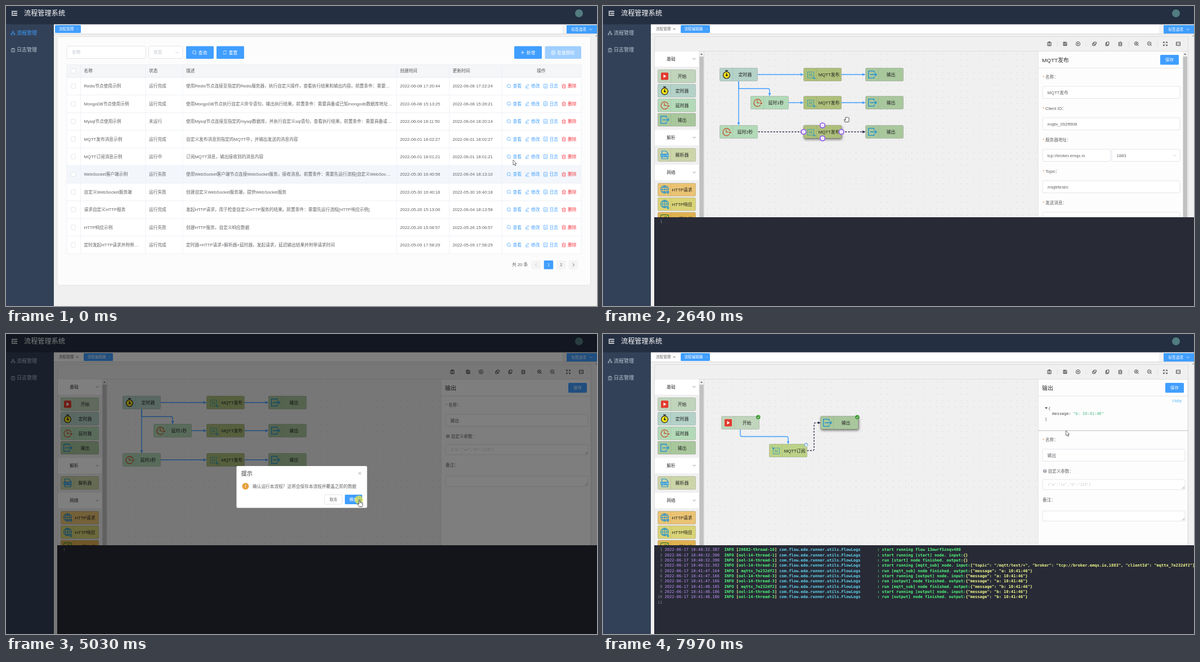
Animation, 1050 px wide and 534 px high, one loop 8000 ms. Source, as an HTML page:

```html
<!DOCTYPE html>
<html>
<head>
<meta charset="utf-8">
<style>
html, body { margin: 0; width: 100%; height: 100%; overflow: hidden; background: #f0f0f0 }
svg { display: block; width: 1050px; height: 534px }
text { font-family: "Liberation Sans", "Noto Sans CJK SC", "Noto Sans CJK", sans-serif; white-space: pre }
.mono { font-family: "DejaVu Sans Mono", monospace }
</style>
</head>
<body>
<svg id="stage" viewBox="0 0 1050 534"></svg>
<script>
const BLUE = '#409eff', RED = '#f5323c', INK = '#606266', LINE = '#dcdfe6';

// Drawing helpers, all returning SVG markup
const rect = (x, y, x2, y2, fill, stroke = 'none', r = 0, more = '') =>
  `<rect x="${x}" y="${y}" width="${x2 - x}" height="${y2 - y}" rx="${r}" fill="${fill}" stroke="${stroke}" stroke-width=".8" ${more}/>`;
const path = (d, stroke, w = 1, fill = 'none', more = '') =>
  `<path d="${d}" stroke="${stroke}" stroke-width="${w}" fill="${fill}" ${more}/>`;
const circle = (x, y, r, fill, stroke = 'none', w = 1, more = '') =>
  `<circle cx="${x}" cy="${y}" r="${r}" fill="${fill}" stroke="${stroke}" stroke-width="${w}" ${more}/>`;
const text = (x, y, s, fill = INK, size = 7.7, more = '') =>
  `<text x="${x}" y="${y + size * .36}" font-size="${size}" fill="${fill}" ${more}>${s}</text>`;
const mid = (x, y, s, fill, size) => text(x, y, s, fill, size, 'text-anchor="middle"');
const at = (x, y, s, more = '') => `<g transform="translate(${x} ${y})" ${more}>${s}</g>`;
const chevron = (x, y, c = '#999') => path(`M${x - 2.5} ${y - 1.2}l2.5 2.5l2.5-2.5`, c, .8);
const cross = (x, y, r, c) => path(`M${x - r} ${y - r}l${2 * r} ${2 * r}m0 ${-2 * r}l${-2 * r} ${2 * r}`, c, .8);

const small = {
  search: 'M2 2l1.3 1.3M2.7-.3a3 3 0 1 1-6 0a3 3 0 1 1 6 0',
  edit: 'M-2.5 2l.5-2l3.5-3.5l1.5 1.5l-3.5 3.5zM-3 3.5h6',
  doc: 'M-3-3.5h6v7h-6zM-1.3-.5h2.6M-1.3 1.5h2.6',
  trash: 'M-3.5-2h7M-1-3.5h2M-2.6-2v5.5h5.2v-5.5M-1-.3v2.3M1-.3v2.3',
  reset: 'M-3-.5a3 3 0 0 1 5.5-1.2v-1.6M3 .5a3 3 0 0 1-5.5 1.2v1.6',
  plus: 'M-3 0h6M0-3v6',
  log: 'M-3-2.5h6v6h-6zM-1-3.5h2v1.5h-2zM-1.3.3h2.6M-1.3 1.9h2.6',
  save: 'M-3-3h5l1 1v5h-6zM-1.5-3v2h2.5v-2M-1.5 3v-2.3h3v2.3',
  play: 'M3.6 0a3.6 3.6 0 1 1-7.2 0a3.6 3.6 0 1 1 7.2 0M-.8-1.2l2 1.2l-2 1.2z',
  stop: 'M3.6 0a3.6 3.6 0 1 1-7.2 0a3.6 3.6 0 1 1 7.2 0M-.8-.8h1.6v1.6h-1.6z',
  layers: 'M-1.2-3h4.4v3.6h-4.4zM-1.2-1h-2v4h4.6v-2.2',
  copy: 'M-1.2-3.3h4v5h-4zM-1.2-1.5h-1.6v5h4v-1.6',
  zoomIn: 'M2 2l1.7 1.7M-2-.5h3M-.5-2v3M2.6-.5a3 3 0 1 1-6.2 0a3 3 0 1 1 6.2 0',
  zoomOut: 'M2 2l1.7 1.7M-2-.5h3M2.6-.5a3 3 0 1 1-6.2 0a3 3 0 1 1 6.2 0',
  full: 'M-3.3-1.2v-2.1h2.1m-2.1 0l2.3 2.3M3.3-1.2v-2.1h-2.1m2.1 0l-2.3 2.3M-3.3 1.2v2.1h2.1m-2.1 0l2.3-2.3M3.3 1.2v2.1h-2.1m2.1 0l-2.3-2.3',
  code: 'M-3.5-3h7v6h-7zM-.8-1.2l-1.2 1.2l1.2 1.2M.8-1.2l1.2 1.2l-1.2 1.2',
  tree: 'M-1-3.3h2v2h-2zM-3.5 1.3h2v2h-2zM1.5 1.3h2v2h-2zM0-1.3v1.3M-2.5 1.3v-1.3h5v1.3'
};
const icon = (name, x, y, c, w = .8) => at(x, y, path(small[name], c, w));

function button(x, y, x2, y2, label, fill = BLUE, ic) {
  const cx = (x + x2) / 2 + (ic ? 5 : 0), cy = (y + y2) / 2, size = ic ? 7.7 : 7.4;
  return rect(x, y, x2, y2, fill, 'none', 1.6) + mid(cx, cy, label, '#fff', size) +
    (ic ? icon(ic, cx - label.length * size / 2 - 7, cy, '#fff') : '');
}

function frame(s) {
  const editing = s.view == 'edit';
  const nav = (y, ic, label, c) => icon(ic, 12.5, y + .5, c, .7) + text(19, y, label, c, 9);
  return rect(0, 0, 1050, 534, '#f0f0f0') + rect(85, 32, 1050, 49, '#fff') +
    rect(85, 49, 1050, 50, '#dedede') + rect(85, 50, 1050, 51, '#e9e9e9') + rect(988, 33, 996, 49, '#f2f2f2') +
    rect(0, 32, 85, 534, '#324157') + rect(0, 0, 1050, 32.6, '#242f42') +
    path('M10 9.5h10M14 13h6M10 16.5h10M10 11.3l2.5 1.7l-2.5 1.7', '#fff', 1.3) +
    text(32, 13, '流程管理系统', '#fff', 12.2, 'font-weight="500"') + circle(1018, 13, 7, '#527c80') +
    nav(47.5, 'tree', '流程管理', editing ? '#bfcbd9' : BLUE) + nav(78, 'log', '日志管理', '#bfcbd9') +
    (editing
      ? text(94, 41, '流程管理', '#666', 6.6) + cross(126.5, 41, 1.6, '#666') +
        rect(138, 34, 190, 48, BLUE, 'none', 1.5) + text(144.5, 41, '流程编辑器', '#fff', 6.6) + cross(184, 41, 1.6, '#79b9fb')
      : rect(87, 34, 133, 48, BLUE, 'none', 1.5) + text(94, 41, '流程管理', '#fff', 6.6) + cross(127, 41, 1.6, '#79b9fb')) +
    rect(996, 34, 1050, 49, BLUE) + text(1004.5, 41.5, '标签选项', '#fff', 6.6) + chevron(1039, 41.5, '#fff') +
    path('M1047 54l1.5-2l1.5 2z', 'none', 0, '#888');
}

const rows = [
  ['Redis节点使用示例', '运行完成', '使用Redis节点连接至指定的Redis服务器，执行自定义操作，查看执行结果和输出内容。前置条件：需要…', '06-08 17:20:44', '06-08 17:22:24'],
  ['MongoDB节点使用示例', '运行完成', '使用MongoDB节点执行自定义命令语句，输出执行结果。前置条件：需要具备或已知mongodb数据库地址…', '06-08 15:13:25', '06-08 15:26:21'],
  ['Mysql节点使用示例', '未运行', '使用Mysql节点连接至指定的mysql数据库，并执行自定义sql语句，查看执行结果。前置条件：需要具备或…', '06-04 18:11:50', '06-04 18:20:14'],
  ['MQTT发布消息示例', '运行完成', '自定义发布消息到指定的MQTT中，并输出发送的消息内容', '06-01 18:02:27', '06-01 18:02:27'],
  ['MQTT订阅消息示例', '运行中', '订阅MQTT消息，输出接收到的消息内容', '06-01 18:01:21', '06-01 18:01:21'],
  ['WebSocket客户端示例', '运行失败', '使用WebSocket客户端节点连接WebSocket服务，接收消息。前置条件：需要先运行流程[自定义WebSoc…', '05-30 16:40:58', '06-04 18:13:10'],
  ['自定义WebSocket服务端', '运行失败', '创建自定义WebSocket服务端，提供WebSocket服务', '05-30 16:40:18', '05-30 16:40:18'],
  ['请求自定义HTTP服务', '运行完成', '发起HTTP请求，用于检查自定义HTTP服务的结果。前置条件：需要先运行流程[HTTP响应示例]', '05-26 15:13:06', '06-04 18:13:58'],
  ['HTTP响应示例', '运行失败', '创建HTTP服务，自定义响应数据', '05-26 15:06:57', '05-26 15:06:57'],
  ['定时发起HTTP请求并附带…', '运行完成', '定时器+HTTP请求+解析器+延时器，发起请求，延迟输出结果并附带请求时间', '05-09 17:58:29', '05-09 17:58:29']
];
const cols = [138.5, 254, 320, 700, 793.5];

function list(s) {
  const check = y => rect(115.5, y - 4, 123.5, y + 4, '#fff', LINE, 1);
  const pager = (x, label, fill = '#f4f4f5', c = INK) =>
    rect(x, 453, x + 16.5, 468.5, fill, 'none', 1) + mid(x + 8.2, 460.7, label, c, 7.2);
  let out = rect(91, 54.5, 1038.5, 497, '#fcfcfc', '#ddd', 2) +
    rect(108, 71.5, 248, 93.5, '#fff', LINE, 2) + text(117, 82.5, '名称', '#c0c4cc') +
    rect(253.5, 71.5, 314, 93.5, '#fff', LINE, 2) + text(262, 82.5, '状态', '#c0c4cc') + chevron(304, 82.5, '#c0c4cc') +
    button(320, 71.5, 369, 94, '查询', BLUE, 'search') + button(374, 71.5, 423, 94, '重置', BLUE, 'reset') +
    button(903, 71.5, 952, 94, '新增', BLUE, 'plus') + button(957.5, 71.5, 1022, 94, '批量删除', '#a0cfff', 'trash') +
    rect(108, 104.5, 1022, 127, '#f5f6f8') + check(115.7) + mid(951, 115.7, '操作', '#555') +
    ['名称', '状态', '描述', '创建时间', '更新时间'].map((h, i) => text(cols[i], 115.7, h, '#555')).join('');
  rows.forEach((row, i) => {
    const top = 127 + i * 31.4, y = top + 15.6;
    out += rect(108, top, 1022, top + 31.4, i == s.row ? '#f3f7fc' : '#fff') + path(`M108 ${top}h914`, '#ebeef5', .8) + check(y);
    row.forEach((v, j) => out += text(cols[j], y, j > 2 ? '2022-' + v : v));
    [['search', '查看'], ['edit', '修改'], ['doc', '日志'], ['trash', '删除']].forEach(([ic, label], j) => {
      const c = j == 3 ? RED : BLUE;
      out += icon(ic, 893.5 + j * 32.5, y, c, .7) + text(900.5 + j * 32.5, y, label, c);
    });
  });
  return out + path('M108 104.5h914v336.5h-914zM132.5 104.5v336.5M248 104.5v336.5M314 104.5v336.5M694 104.5v336.5M787.5 104.5v336.5M881 104.5v336.5M108 127h914', '#ebeef5', .8) +
    text(899, 460.7, '共 20 条') + pager(933.5, '') + pager(955.7, '1', BLUE, '#fff') + pager(978, '2') + pager(999.8, '') +
    path('M943 458.2l-2.5 2.5l2.5 2.5', '#c0c4cc') + path('M1007 458.2l2.5 2.5l-2.5 2.5', INK);
}

const SKY = '#1f90d0', RUST = '#c9421f', LEAF = '#32852c';
const globe = circle(0, -.5, 6.8, 'none', SKY, 1.1) +
  path('M-6.8-.5h13.6M0-7.3v13.6M-5.5-4.5h11M-5.5 3.5h9M0-7.3c-5 4-5 10 0 13.6M0-7.3c5 4 5 10 0 13.6', SKY, .9);
const socket = circle(-3, 3.5, 1, LEAF) + rect(-7, -7, 7, 7, 'none', LEAF, 3, 'style="stroke-width:1.3"') +
  path('M-4 0a4 4 0 0 0 6 4M-4-2.5a6.5 6.5 0 0 0 8.5 5M-1-3.5h5', LEAF, 1.1);
const letterM = rect(-5, -4.5, 6, 6, 'none', '#2d9cae') + mid(.5, .8, 'M', '#2d9cae', 7);
const kinds = {
  start: ['#c0d5bc', rect(-6.5, -6.5, 6.5, 6.5, '#e23a2e', 'none', 1.5) + path('M-2-3l5 3l-5 3z', 'none', 0, '#fff')],
  timer: ['#b4d2c8', circle(0, 1, 6, '#f5e21c', '#222', 1.2) + path('M-2.5-7h5M0-7v2M0-2.5v4h2.5', '#222', 1.4) + circle(0, 1.5, 1.4, '#222')],
  delay: ['#b3dab8', path('M5.5 4a6.5 6.5 0 1 1 .8-5.5M-.5-4v4.5h4', RUST, 1.2) + path('M4 .3h5l-2.5 3z', 'none', 0, RUST)],
  output: ['#a9c79d', path('M3-3.5v-2.8h-9.8v12.6h9.8v-2.8M-4 0h11.5M4.5-3l3 3l-3 3', SKY, 1.3)],
  json: ['#ccd5a8', path('M-5-1v-6h7l3.5 3.5v2.5M-5 4v3h10.5v-3', SKY, 1.2) + rect(-7, -2, 7, 4, SKY) + mid(0, 1, 'JSON', '#fff', 5)],
  request: ['#eac373', globe + path('M6 8v-5M4 5l2-2l2 2', SKY, 1.3)],
  response: ['#d9d377', globe + path('M6 3v5M4 6l2 2l2-2', SKY, 1.3)],
  server: ['#dfb24f', socket],
  client: ['#e5bd89', socket],
  sub: ['#bcd287', letterM + path('M-8-6.5l4 3.5M-4-5.5v2.5h-2.5', SKY)],
  pub: ['#adbf7a', letterM + path('M4 4l4 3.5M8 5v2.5h-2.5', SKY)],
  mysql: ['#e5d291', circle(0, 0, 5.5, '#258fae')],
  next: ['#aac8e6', '']
};
function box(kind, label, x, y, dx, more = '') {
  const [fill, art] = kinds[kind];
  return `<g ${more}>` + rect(x, y - 11.5, x + 67, y + 11.5, fill, '#0003', 1.5) + path(`M${x + 23} ${y - 11.5}v23`, '#0001') +
    at(x + 12, y, art) + mid(x + dx, y + .3, label, '#222', 7.8) + '</g>';
}

const palette = [
  ['基础', 94, ['start', '开始'], ['timer', '定时器'], ['delay', '延时器'], ['output', '输出']],
  ['解析', 234, ['json', '解析器']],
  ['网络', 296, ['request', 'HTTP请求'], ['response', 'HTTP响应'], ['server', 'WS服务端'], ['client', 'WS客户端'], ['sub', 'MQTT订阅'], ['pub', 'MQTT发布']],
  ['数据库', 488, ['mysql', 'Mysql'], ['next', '']]
];
const tools = { log: 793, save: 821, play: 844, layers: 873, copy: 896, trash: 919, zoomIn: 948, zoomOut: 971, full: 999, code: 1022 };

const flows = [null, {
  nodes: {
    t: ['timer', '定时器', 207.5, 122], m1: ['pub', 'MQTT发布', 356.5, 122], o1: ['output', '输出', 466.5, 122],
    d1: ['delay', '延时1秒', 262.5, 172], m2: ['pub', 'MQTT发布', 356.5, 172], o2: ['output', '输出', 466.5, 172],
    d2: ['delay', '延时2秒', 207.5, 224], m3: ['pub', 'MQTT发布', 356.5, 224], o3: ['output', '输出', 466.5, 224]
  },
  edges: [['t', 'm1', 'M274.5 122H355.5'], ['m1', 'o1', 'M423.5 122H465.5'], ['d1', 'm2', 'M329.5 172H355.5'], ['m2', 'o2', 'M423.5 172H465.5'],
    ['d2', 'm3', 'M274.5 224H355.5'], ['m3', 'o3', 'M423.5 224H465.5'], ['t', 'd2', 'M241 134V211.5'], ['t', 'd1', 'M241 134V147H293q3 0 3 3V159.5']]
}, {
  nodes: { s: ['start', '开始', 210.5, 158], o: ['output', '输出', 386.5, 158], m: ['sub', 'MQTT订阅', 295.5, 207.5] },
  edges: [['s', 'm', 'M244 170V180q0 2.5 3 2.5H326q3 0 3 3V195'], ['m', 'o', 'M363 207.5H372q3 0 3-3V161q0-3 3-3H386']]
}];

function badge(x, y, done, t) {
  return done
    ? circle(x, y, 3.8, '#3d9a32') + path(`M${x - 1.8} ${y}l1.4 1.5l2.3-2.8`, '#fff', .9)
    : circle(x, y, 3, '#dbe9f2', '#a9c6dc', .8) + circle(x, y, 3, 'none', '#6aa5d8', 1, `stroke-dasharray="12 7" transform="rotate(${t / 3 % 360} ${x} ${y})"`);
}

function graph(s, t) {
  const { nodes, edges } = flows[s.flow];
  let out = '';
  for (const [a, b, d] of edges) {
    const live = s.sel == a || s.sel == b;
    out += path(d, live ? '#29264a' : BLUE, 1.4, 'none', live
      ? `stroke-dasharray="3 2.4" stroke-dashoffset="${-t / 40 % 5.4}" marker-end="url(#dark)"` : 'marker-end="url(#blue)"');
  }
  for (const id in nodes) {
    const [kind, label, x, y] = nodes[id];
    const lit = id == s.sel || id == s.over;
    out += box(kind, label, x, y, 45, lit ? 'style="filter:drop-shadow(1px 2px 2px #0008)"' : '');
    if (id == s.ports) for (const [dx, dy] of [[0, 0], [33.5, -11.5], [67, 0], [33.5, 11.5]])
      out += circle(x + dx, y + dy, 4.3, '#fff', '#9a66ee', 2) + circle(x + dx, y + dy, 1, '#caa8ff');
    if (s.busy.includes(id) || s.done.includes(id)) out += badge(x + 65.3, y - 10, s.done.includes(id), t);
  }
  return out;
}

function panel(s) {
  const tall = s.panel == 'mqtt', right = tall ? 1025 : 1034;
  const label = (y, v, must = 1) => (must ? text(781, y, '*', '#e6824a') : '') + text(must ? 786 : 781, y, v + '：', INK, 7.6);
  const field = (y, v, x = 781, x2 = right) => rect(x, y, x2, y + 21.5, '#fff', LINE, 2) + text(x + 8.5, y + 10.8, v);
  const area = (y, v = '') => rect(781, y, 1034, y + 18, '#fff', LINE, 2) + text(790, y + 9, v, '#c0c4cc', 6.4, 'class="mono"') +
    path(`M1029 ${y + 16.5}l4-4M1031.5 ${y + 16.5}l1.5-1.5`, '#777', .7);
  const titles = { mqtt: 'MQTT发布', delay: '延时2秒', out: '输出', json: '输出' };
  let form = label(126, '名称') + field(143, titles[s.panel]);
  if (tall) form += label(182, 'Client ID') + field(199, 'mqttx_092ff908') + label(238, '服务器地址') +
    field(255, 'tcp://broker.emqx.io', 781, 902) + field(255, '1883', 904, 1025) + chevron(1016, 266, '#c0c4cc') +
    label(294.5, 'Topic') + field(311, '/mqtt/test/c') + label(350.5, '发送消息') + field(367, 'c: ${timestamp}');
  else if (s.panel == 'delay') form += label(182, '延时时间') + field(199, '2', 781, 902) + field(199, '秒', 904, 1034) + chevron(1025, 210, '#c0c4cc') +
    label(238, '备注', 0) + area(256);
  else form += circle(785, 182, 3.3, '#a8abb2') + mid(785, 182, '?', '#fff', 5) + text(790.5, 182, '自定义参数：', INK, 7.6) +
    area(197, '{"a":"xx","b":"123"}') + label(233, '备注', 0) + area(253);
  return rect(773, 80.5, 1039, 378, '#fdfdfd', '#ddd') + text(780, 96, titles[s.panel], '#303133', 9.9) +
    path('M773 110.5h266', '#ddd', .8) + button(right - 35, 87, right - 2, 104.5, '保存') +
    (s.panel == 'json'
      ? text(1011, 118, 'copy', '#49b3ff', 7.2, 'class="mono"') + path('M785 130.5h5l-2.5 3z', 'none', 0, '#444') +
        text(791, 132, '{', '#555', 7, 'class="mono"') + text(798, 141.5, 'message:', '#444', 7, 'class="mono"') +
        text(835, 141.5, '"b: 10:41:46"', '#42b983', 7, 'class="mono"') + text(785, 151, '}', '#555', 7, 'class="mono"') +
        path('M773 172h266', '#bbb') + at(0, 62, form)
      : form) +
    (tall ? rect(1030, 81, 1038.5, 378, '#f1f1f1') + rect(1030.5, 90, 1038, 378, '#c1c1c1') + path('M1032 87l2.2-3l2.2 3z', 'none', 0, '#777') : '');
}

const logs = [[], [
  ['10:41:46.182', '20882-thread-11', 'start running flow 3gsaefsrjvc000'],
  ['10:41:46.186', 'ool-15-thread-1', 'start running [timer] node. input:{"times": "2", "period": "5,SECONDS", "timestamp": "HH:mm:ss"}'],
  ['10:41:46.188', 'scheduledTask-1', 'run [timer] node finished. output:{"timestamp": "10:41:46"}'],
  ['10:41:46.191', 'ool-15-thread-1', 'start running [mqtt_pub] node. input:{"topic": "/mqtt/test/a", "broker": "tcp://broker.emqx.io,1883", "message": "a: ${timestamp}", '],
  ['10:41:46.193', 'ool-15-thread-2', 'start running [delay] node. input:{"delay": "1,SECONDS", "payload": {"timestamp": "${timestamp}"}, "timestamp": "10:41:46"}'],
  ['10:41:46.194', 'ool-15-thread-3', 'start running [delay] node. input:{"delay": "2,SECONDS", "payload": {"timestamp": "${timestamp}"}, "timestamp": "10:41:46"}'],
  ['10:41:47.160', 'ool-15-thread-1', 'run [mqtt_pub] node finished. output:{"message": "a: 10:41:46"}']
], [
  ['10:40:32.387', '20882-thread-10', 'start running flow 13mwrf5znqv400'],
  ['10:40:32.390', 'ool-14-thread-1', 'start running [start] node. input:{}'],
  ['10:40:32.390', 'ool-14-thread-1', 'run [start] node finished. output:{}'],
  ['10:40:32.392', 'ool-14-thread-2', 'start running [mqtt_sub] node. input:{"topic": "/mqtt/test/+", "broker": "tcp://broker.emqx.io,1883", "clientId": "mqttx_7e232df2"}'],
  ...[['10:41:47.164', '10:41:47.166', 'a'], ['10:41:48.185', '10:41:48.186', 'b']].flatMap(([got, sent, k]) => {
    const body = `put:{"message": "${k}: 10:41:46"}`;
    return [[got, 'mqttx_7e232df2', 'run [mqtt_sub] node finished. out' + body],
      [sent, 'ool-14-thread-3', 'start running [output] node. in' + body],
      [sent, 'ool-14-thread-3', 'run [output] node finished. out' + body]];
  })
]];

function terminal([id, count]) {
  const span = (c, v, weight = 'bold') => `<tspan fill="${c}" font-weight="${weight}">${v}</tspan>`;
  let out = rect(91, 376, 1050, 534, '#282a36');
  for (let i = 0; i <= count; i++) {
    const y = 383.7 + i * 9.35;
    out += text(105.5, y, i + 1, '#7d8290', 7.05, 'class="mono" text-anchor="end"');
    if (i == count) break;
    const [time, thread, msg] = logs[id][i], cut = (msg + '{').indexOf('{');
    out += text(109.5, y, span('#bd93f9', '2022-06-17 ' + time, 'normal') + span('#50fa7b', '  INFO ') + span('#f1fa8c', '[') +
      span('#50fa7b', thread.padStart(15)) + span('#f1fa8c', ']') + span('#62d5f0', ' com.flow.eda.runner.utils.FlowLogs') +
      span('#50fa7b', '       : ' + msg.slice(0, cut)) + span('#f1fa8c', msg.slice(cut)), '#fff', 7.05, 'class="mono"');
  }
  return out;
}

function tooltip([x, label]) {
  const w = label.length * 3.35 + 5.3;
  return rect(x - w, 82, x + w, 101, '#303133', 'none', 2) + path(`M${x - 3} 82.2l3-3l3 3z`, 'none', 0, '#303133') + mid(x, 91.5, label, '#fff', 6.7);
}

function editor(s, t) {
  let out = rect(91.5, 54.5, 1039.5, 535, '#f0f0f0', '#d9d9d9') + rect(180, 80.5, 1039, 534, 'url(#grid)') +
    path('M91 80.5h948M179.5 80.5v454', '#d9d9d9', .8) + path('M807 63v9M858 63v9M934 63v9M985 63v9', '#ddd', .8);
  for (const k in tools) out += icon(k == 'play' && s.running ? 'stop' : k, tools[k], 67.3, '#333', .9);
  if (s.palette) {
    for (const [name, y, ...items] of palette) {
      out += rect(92, y - 13.5, 170, y + 14, '#fff') + mid(121, y, name, '#333', 7.7) + chevron(162, y, '#777');
      items.forEach(([kind, label], i) => out += box(kind, label, 97.5, y + 31 + i * 25.85, 43));
    }
    out += rect(171, 81, 179, 534, '#f1f1f1') + rect(171.3, 90, 178.7, 490, '#c1c1c1') + path('M172.7 87l2.2-3l2.2 3z', 'none', 0, '#777');
  }
  if (s.flow) out += graph(s, t);
  if (s.panel) out += panel(s);
  if (s.log) out += terminal(s.log);
  if (s.tip) out += tooltip(s.tip);
  return out;
}

const dialog = fade => `<g opacity="${fade}">` + rect(0, 0, 1050, 534, '#00000080') + rect(409.5, 235, 641.5, 309.5, '#fff', 'none', 2) +
  text(418, 248, '提示', '#303133', 9.9) + cross(628.5, 248, 2.5, '#909399') + circle(425.5, 271, 6, '#e6a23c') + mid(425.5, 271, '!', '#fff', 9) +
  text(438, 271, '确认运行本流程？这将会保存本流程并覆盖之前的数据') + rect(566, 286, 597, 303, '#fff', LINE, 2) +
  mid(581.5, 294.5, '取消', INK, 6.6) + button(602, 286, 633, 303, '确定') + '</g>';

const message = fade => `<g opacity="${fade}" transform="translate(0 ${(fade - 1) * 11})">` + rect(421, 10.5, 630, 37.5, '#f0f9eb', '#e1f3d8', 2) +
  circle(437, 24, 4, '#67c23a') + path('M435 24l1.5 1.6l2.6-3', '#fff') + text(447, 24, '操作成功', '#67c23a') + '</g>';

const pointers = {
  arrow: path('M0 0v9l2.1-1.9l1.4 3.2l1.4-.6l-1.4-3.1h2.8z', '#333', .7, '#fff'),
  hand: path('M-1 0q1-1.2 2 0v4q1.3-.7 1.7.3q1.3-.5 1.6.6q1.4-.3 1.4 1v2.6l-1.2 3h-5l-2.8-4.5q0-1.5 1.5-.8l.8.8z', '#222', .8, '#fff'),
  grab: path('M-3 4.5l-1.6-4q.6-1.3 1.5 0l.6 1v-5q.8-1.2 1.6 0q.8-1.6 1.7 0q1.2-.9 1.6.4q1.5-.5 1.6.8v4.3l-1 2.5z', '#222', .8, '#fff')
};

// Each step overrides part of the state and keeps the rest
const cur = (kind, x, y) => ({ cur: [kind, x, y] });
const steps = [
  [0, { view: 'list', row: 5, busy: [], done: [], ...cur('arrow', 901, 274) }],
  [270, { row: 4, ...cur('hand', 926, 262) }],
  [530, { row: 3, ...cur('hand', 937, 238) }],
  [800, { view: 'edit', ...cur('arrow', 937, 238) }],
  [1060, cur('arrow', 815, 190)],
  [1330, { palette: 1, ...cur('arrow', 802, 120) }],
  [1600, { flow: 1, ...cur('hand', 797, 70) }],
  [1850, { tip: [792.5, '查看日志'], ring: [795.5, 67], ...cur('hand', 796, 69) }],
  [2120, { tip: 0, ring: 0, log: [0, 0], ...cur('grab', 690, 135) }],
  [2390, { sel: 'd2', panel: 'delay', ...cur('hand', 250, 222) }],
  [2640, { sel: 'm3', ports: 'm3', panel: 'mqtt', ...cur('grab', 433, 202) }],
  [2920, { ports: 0, over: 'o2', ...cur('hand', 500, 170) }],
  [3190, cur('hand', 497, 171)],
  [3460, { sel: 'o2', over: 0, panel: 'out' }],
  [3720, cur('grab', 640, 130)],
  [3980, cur('arrow', 830, 72)],
  [4250, { tip: [844, '运行'], ...cur('hand', 847, 63) }],
  [4510, { tip: 0, sel: 0, modal: .5 }],
  [4770, { modal: 1, ...cur('arrow', 735, 200) }],
  [5030, { ring: [627, 295], ...cur('hand', 628, 296) }],
  [5300, { ring: 0, modal: .4 }],
  [5560, { modal: 0, toast: 1, running: 1, log: [1, 6], busy: ['t', 'm1', 'd1', 'd2'], ...cur('grab', 570, 200) }],
  [5820, { sel: 'o1', ...cur('hand', 505, 122) }],
  [6080, cur('grab', 770, 160)],
  [6340, cur('grab', 762, 152)],
  [6630, { log: [1, 7], ...cur('arrow', 800, 75) }],
  [6900, { flow: 2, sel: 0, panel: 0, toast: .4, log: [2, 6], busy: ['m'], done: ['s', 'o'] }],
  [7170, { toast: 0, log: [2, 10], ...cur('grab', 560, 190) }],
  [7430, { sel: 'o', panel: 'json', ...cur('hand', 428, 160) }],
  [7700, cur('grab', 705, 175)],
  [7970, cur('arrow', 822.5, 172)]
];
let state = {};
for (const step of steps) step[1] = state = { ...state, ...step[1] };

const arrowHead = (id, c) => `<marker id="${id}" markerUnits="userSpaceOnUse" markerWidth="6" markerHeight="6" refX="4.5" refY="3" orient="auto">${path('M0 .5l5 2.5l-5 2.5z', 'none', 0, c)}</marker>`;
const defs = `<defs>${arrowHead('blue', BLUE)}${arrowHead('dark', '#29264a')}<pattern id="grid" x="180" y="80" width="11" height="11" patternUnits="userSpaceOnUse">${circle(5.5, 5.5, .55, '#c4c4c4')}</pattern></defs>`;

function scene(s, t) {
  return defs + frame(s) + (s.view == 'list' ? list(s) : editor(s, t)) +
    (s.modal ? dialog(s.modal) : '') + (s.toast ? message(s.toast) : '') +
    (s.ring ? circle(...s.ring, 7.5, '#f5ea3cb0') : '') + at(s.cur[1], s.cur[2], pointers[s.cur[0]]);
}

const stage = document.getElementById('stage');
let shown, begin;
function tick(now) {
  begin ??= now;
  const t = (now - begin) % 8000;
  const step = steps.findLast(([from]) => from <= t) || steps[0];
  if (step != shown) stage.innerHTML = scene((shown = step)[1], step[0]);
  requestAnimationFrame(tick);
}
requestAnimationFrame(tick);
</script>
</body>
</html>
```
